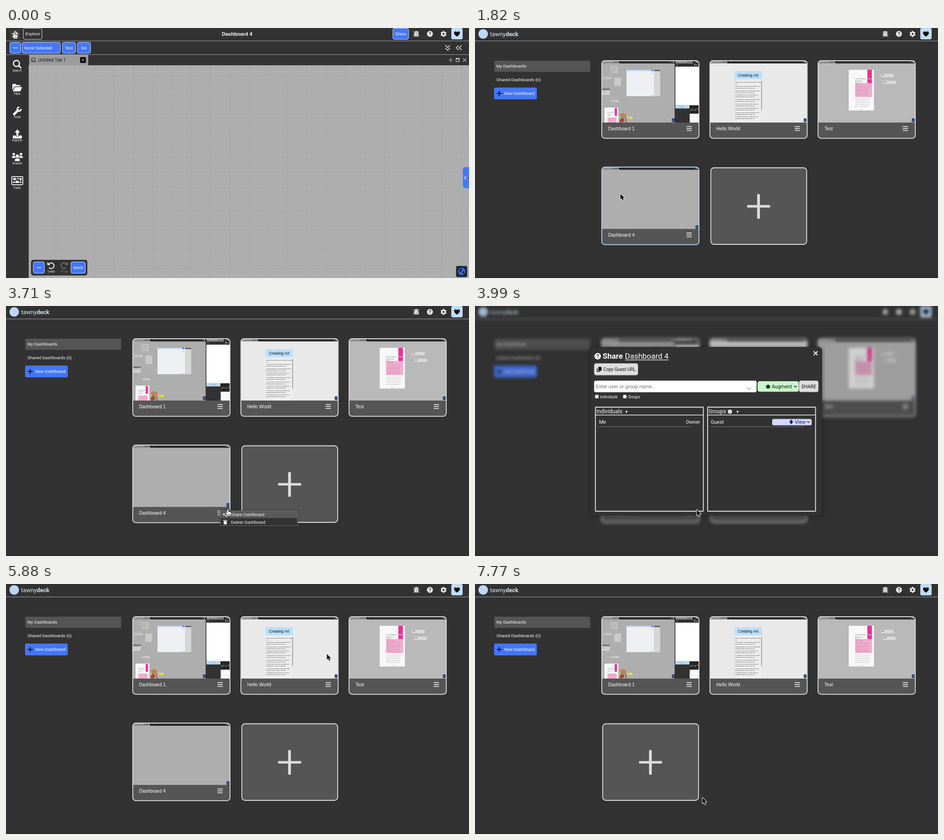
An HTML page with a canvas that plays this animation: 1019 px wide and 550 px high, repeating every 8.4 s.

```html
<!DOCTYPE html>
<html lang="en">
<head>
<meta charset="utf-8">
<title>Dashboards</title>
<style>
html, body { margin: 0; width: 100%; height: 100%; overflow: hidden; background: #323232; }
canvas { display: block; width: 1019px; height: 550px; }
</style>
</head>
<body>
<canvas id="stage" width="1019" height="550"></canvas>
<script>
const W = 1019, H = 550, LOOP = 8400, STEP = 70;
const SANS = '"Liberation Sans", Arial, sans-serif', ROBOTO = 'Roboto, sans-serif';
const DARK = '#323232', BLUE = '#4476f7', PALE = '#bfdcf9', WHITE = '#fff', GREY = '#aeaeae', PINK = '#ec2f96';
const stage = document.getElementById('stage').getContext('2d');
let c = stage;

// ---- drawing helpers ----
function box(x, y, w, h, fill, r = 0, edge, lw = 1) {
  c.beginPath();
  c.roundRect(x, y, w, h, r);
  if (fill) { c.fillStyle = fill; c.fill(); }
  if (edge) { c.strokeStyle = edge; c.lineWidth = lw; c.stroke(); }
}
function disc(x, y, r, fill, ry = r) {
  c.beginPath();
  c.ellipse(x, y, r, ry, 0, 0, 7);
  c.fillStyle = fill;
  c.fill();
}
function ring(x, y, r, color, lw, from = 0, to = 2 * Math.PI) {
  c.beginPath();
  c.arc(x, y, r, from, to);
  c.strokeStyle = color;
  c.lineWidth = lw;
  c.stroke();
}
function shape(d, x, y, fill, edge, lw = 1, cap = 'butt') {
  const p = new Path2D(d);
  c.save();
  c.translate(x, y);
  c.lineCap = cap;
  c.lineJoin = 'round';
  if (edge) { c.strokeStyle = edge; c.lineWidth = lw; c.stroke(p); }
  if (fill) { c.fillStyle = fill; c.fill(p); }
  c.restore();
}
const stroke = (d, x, y, color, lw, cap) => shape(d, x, y, null, color, lw, cap);
function text(s, x, y, size, color = WHITE, font = SANS, style = '', align = 'left') {
  c.font = `${style} ${size}px ${font}`;
  c.textAlign = align;
  c.fillStyle = color;
  c.fillText(s, x, y + size * 0.36);
}
const button = (x, y, w, h) => box(x + .5, y + .5, w - 1, h - 1, BLUE, 3.5, '#dbe4fb');
const cross = (x, y, r, color, lw) => stroke(`M${-r} ${-r}L${r} ${r}M${r} ${-r}L${-r} ${r}`, x, y, color, lw);

// ---- shared header icons ----
function headerIcons() {
  shape('M-3.2 -3.6A3.2 3.2 0 0 1 3.2 -3.6Z', 903, 13.2, '#eee');
  shape('M-3.8 -2.8H3.8V2Q3.8 5.8 0 5.8Q-3.8 5.8 -3.8 2Z', 903, 13.2, '#eee');
  stroke('M-6.3 .6H6.3M-5.6 -5L-3 -2.4H3L5.6 -5M-5.6 5.4L-3 3H3L5.6 5.4', 903, 13.2, '#eee', 1.3, 'round');
  box(902.6, 12, .8, 7, DARK);
  disc(933, 13, 6.5, '#eee');
  text('?', 933, 13, 10, DARK, SANS, 'bold', 'center');
  for (let i = 0; i < 6; i++) {
    c.save();
    c.translate(963, 13);
    c.rotate(i * Math.PI / 3);
    box(-1.7, -6.5, 3.4, 4, '#eee', .6);
    c.restore();
  }
  ring(963, 13, 3.6, '#eee', 2.8);
  box(980, 0, 25, 25, PALE, 3.5);
  shape('M0 6C-4 2.6 -6.3 .6 -6.3 -2C-6.3 -5.8 -1.8 -6.6 0 -3.4C1.8 -6.6 6.3 -5.8 6.3 -2C6.3 .6 4 2.6 0 6Z', 992.5, 13, '#050505');
  box(0, 28, W, 1, '#a5a5a5');
}

// ---- workspace ----
function sidebar() {
  const names = ['Search', 'Files', 'Tools', 'Imports', 'Shared', 'Trails'];
  names.forEach((n, i) => text(n, 24.5, [93.5, 144.5, 195.5, 246.5, 298, 352][i], 6.6, WHITE, SANS, '', 'center'));
  ring(23, 78, 6.7, WHITE, 2.5);
  stroke('M28 83L33.5 88.5', 0, 0, WHITE, 3);
  shape('M14 137V124.5Q14 123 15.5 123H21L23.5 125.5H30Q31.5 125.5 31.5 127V128.5H19.5Z', 0, 0, WHITE);
  shape('M20 130H35.5L31.5 139.5H15Z', 0, 0, WHITE);
  stroke('M17.8 189.6L26.5 181', 0, 0, WHITE, 5, 'round');
  ring(28.8, 178.6, 4.1, WHITE, 3.2, -.1, 4.9);
  box(15, 236.5, 20, 6.5, WHITE, 1.5);
  box(21.5, 234, 7, 4.5, DARK, 1);
  shape('M25 223L31 230H27.2V237.4H22.8V230H19Z', 0, 0, WHITE);
  for (const [x, y, r] of [[17, 277.5, 2.7], [33, 277.5, 2.7], [25, 282, 3.7]]) {
    disc(x, y, r, WHITE);
    box(x - r * 1.45, y + r + 1.2, r * 2.9, r * 1.65, WHITE, [r, r, 1, 1]);
  }
  box(12.8, 326.8, 24, 18, null, 1.5, WHITE, 1.8);
  for (const [x, y, w, h] of [[16, 330, 6, 4], [25, 330, 3, 2], [30, 330, 4, 5], [16, 338, 3, 3], [21, 336, 7, 5], [30, 338, 4, 3]]) box(x, y, w, h, WHITE, .5);
  stroke('M22 332H30M18 334V339M19 340H31M32 335V338', 0, 0, WHITE, .8);
}
function workspace(glow) {
  box(0, 0, W, H, DARK);
  headerIcons();
  box(9, 4, 22, 22, `rgba(255,255,255,${glow})`, 3);
  shape('M20 6L28 13.5H26V21H14V13.5H12Z', 0, 0, '#d4d4d4');
  box(38, .5, 41, 24.5, null, 3.5, '#e8e8e8');
  text('Explore', 42.5, 13, 9.5);
  text('Dashboard 4', 508.5, 13, 11.1, WHITE, SANS, 'bold', 'center');
  button(851, 0, 35.5, 25.5);
  text('Share', 856, 13, 9.5);
  button(8, 31, 25, 25);
  box(15, 43, 11, 1.2, WHITE);
  button(35, 31, 85, 25);
  text('None Selected', 40, 43.5, 9.4);
  button(123.5, 31, 30, 25);
  text('Text', 138.5, 43.5, 9.4, WHITE, SANS, '', 'center');
  button(156.5, 31, 30, 25);
  text('Ink', 171.5, 43.5, 9.4, WHITE, SANS, '', 'center');
  stroke('M-5 -6L0 -1L5 -6M-5 0L0 5L5 0', 972, 44, '#eee', 1.7);
  stroke('M-1 -5L-6 0L-1 5M5.5 -5L.5 0L5.5 5', 997, 43.5, '#eee', 1.7);
  box(0, 58, W, 1, '#a5a5a5');

  sidebar();
  box(50, 59, W - 50, 23, '#333');
  box(51, 59, 130, 23, '#9c9c9c');
  box(56.5, 66.5, 7.5, 5.5, null, .8, '#222', 1.1);
  box(54.5, 73.2, 11.5, 1.2, '#222');
  text('Untitled Tab 1', 70.5, 70.3, 10, '#1c1c1c', ROBOTO);
  box(163, 64, 13, 13, '#0a0a0a', 3);
  cross(169.5, 70.5, 2.7, WHITE, 1);
  stroke('M-5.5 0H5.5M0 -5.5V5.5', 979, 70.5, '#bbb', 1.2);
  box(990.5, 67, 7, 7, null, 0, '#eee', 1.1);
  box(990, 66.5, 8, 2, '#eee');
  cross(1009.5, 70.5, 4, '#bbb', 1.2);

  box(50, 82, W - 50, H - 82, GREY);
  c.setLineDash([2, 2.2]);
  c.strokeStyle = '#989898';
  c.lineWidth = .8;
  c.beginPath();
  for (let x = 67.5; x < W; x += 42.5) { c.moveTo(x, 82); c.lineTo(x, H); }
  for (let y = 104.5; y < H; y += 42.5) { c.moveTo(50, y); c.lineTo(W, y); }
  c.stroke();
  c.setLineDash([]);

  box(55, 510, 124, 34.5, DARK, 5);
  button(59.5, 514, 25.5, 26);
  box(67, 526.5, 11, 1.2, WHITE);
  for (const [x, name, flip, color] of [[99, 'Undo', 1, WHITE], [128, 'Redo', -1, '#777']]) {
    c.save();
    c.translate(x, 523);
    c.scale(flip, 1);
    ring(.5, 0, 6.3, color, 2, -2.7, 2.5);
    shape('M-8 -8V-1.5H-1.5Z', 0, 0, color);
    c.restore();
    text(name, x + .5, 536, 6.6, color, SANS, '', 'center');
  }
  button(142.5, 514, 32.5, 26);
  text('stack', 158.7, 527, 9.5, WHITE, SANS, '', 'center');

  box(1005.5, 306, 20, 46.5, BLUE, 6);
  stroke('M2 -4L-2 0L2 4', 1011, 329.5, WHITE, 1.2);
  box(990.5, 523.5, 24.5, 24.5, '#1d2634', 3.5);
  disc(1003, 535.5, 7.8, BLUE);
  shape('M-6 -2L-3 -6L1 -6L2 -3L-1 -1L-1 2L-3 3L-5 1ZM2 0L6 -1L6 3L3 6L1 4Z', 1003, 535.5, '#1d2634');
}

// ---- thumbnails; origin is the inner corner ----
function strip(w) {
  box(0, 0, w, 6, '#2c2c2c');
  box(0, 0, 42, 6, '#8f8f8f');
  text('Untitled Tab 1', 24, 3, 2.8, '#222', ROBOTO);
  box(38, 1, 4, 4.5, '#0a0a0a', 1);
  box(w - 9, 2, 1.5, 1.5, '#bbb');
  box(w - 5, 1.5, 2, 2.5, '#ddd');
}
function lines(rows, x, y, size, gap, color = '#444', style = '') {
  rows.forEach((s, i) => text(s, x, y + i * gap, size, color, SANS, style));
}
const mark = (x, y) => { box(x, y, 6, 7.5, '#1d2b4d', 1); disc(x + 3, y + 3.7, 1.6, '#5f86e0'); };

function thumbBlank(w) {
  box(0, 0, w, 140, GREY);
  strip(w);
  mark(206, 128);
}
function thumbMixed(w) {
  box(0, 0, w, 140, GREY);
  box(18.5, 12, 16, 15, '#c6c6c6');
  lines(['Notes and ideas', 'for the studio', 'and the project', 'this week'], 19.5, 15, 2, 3);
  box(3, 36, 18, 4.5, '#d0d0d0', 1);
  text('Search the list', 4, 38.2, 2, '#444');
  box(26.5, 36, 16, 20, '#c9c9c9', 0, '#999', .5);
  box(54, 20, 61, 58, '#eef0f4');
  box(54, 20, 61, 2.5, '#c2d3ee');
  box(115, 20, 13, 58, '#d6d6d6');
  box(115, 20, 13, 3, '#666');
  text('View', 108, 27, 2.2, '#444');
  text('Reset all', 105, 76, 2.2, '#444');
  box(109, 20, 4, 3, BLUE);
  box(0, 61, 17, 4, '#777');
  box(0, 65, 17, 10, '#cfcfcf');
  text('Add a title', 1.5, 68, 2, '#444');
  box(20, 87, 17, 4, '#d0d0d0');
  text('Type here', 21, 89, 2, '#444');
  box(5.5, 103, 30.5, 34, '#f6f6f6');
  box(28, 104, 5, 17, PINK);
  lines(['Food, Nutrition,', 'Health and', 'Fitness'], 12, 113, 2.3, 3.5);
  box(12, 125, 20, 12, '#f3aacd');
  box(37, 115, 21, 22, '#b7b3ae');
  shape('M38 118L46 115L54 118L52 125L43 126Z', 0, 0, '#b9854f');
  stroke('M43 125L40 137M51 125L54 136M46 126V131', 0, 0, '#8a562d', 2);
  shape('M38 130L47 126L50 133L41 137Z', 0, 0, '#a04b35');
  box(58, 123.5, 9, 4.5, '#f2e83d');
  text('Note', 59, 125.8, 2, '#333');
  strip(161);
  mark(154, 127);
  box(160, 0, 54, 140, '#262626');
  c.save();
  c.translate(162, 0);
  strip(w - 162);
  c.restore();
  box(161, 6, w, 6.5, '#303030');
  stroke('M164 10L167 8M203 8H206M203 10H206M209 8V11', 0, 0, '#eee', .9);
  box(161.5, 13, 52, 85, WHITE);
  box(161.5, 97, 31, 8, '#b9d8f3');
  box(161.5, 105, 31, 32, '#323232');
  box(192.5, 98, 21, 18.5, '#262626');
  text('Documents', 170, 101, 2.3, '#345');
  stroke('M196 107V110M199 107H201M205 107V110M209 107H211', 0, 0, '#ddd', 1.3);
  box(193, 116.5, 21, 20.5, '#f7f7f7');
}
function thumbText(w) {
  box(0, 0, w, 140, '#e9e9e9');
  strip(w);
  box(54, 23, 60, 17, '#b9dffb');
  text('Creating Art', 83.7, 31.5, 8.4, '#111', SANS, '', 'center');
  box(54, 44, 58.5, 92, '#ededed');
  box(112.5, 45, 1.2, 64, '#777');
  lines(['What are the most important techniques on creating', 'art?'], 55, 47, 2.3, 4, '#000', 'bold');
  const tips = ['Observation: Closely study the subject you', 'Experimentation: Try out different materials',
    'Sketching: Draw loose plans before you', 'Composition: Arrange the parts of a picture',
    'Color Theory: Learn how colors do work', 'Perspective: Use depth to make space in',
    'Practice: Work often to build steady skills', 'Seeking Feedback: Ask others to look at'];
  tips.forEach((s, i) => {
    const y = 56 + i * 9.65;
    text(`${i + 1}. ${s}`, 55, y, 2.5, '#000', SANS, 'bold');
    text('drawing and then look at it with care.', 55, y + 4, 2.5, '#000', SANS, 'bold');
  });
  mark(206, 127);
}
function thumbPoster(w) {
  box(0, 0, w, 140, '#b9b9b9');
  strip(w);
  box(67, 20, 55.5, 89.5, '#f8f8f8');
  box(108, 20, 10, 30, PINK);
  text('Plan', 113, 40, 3, WHITE, SANS, 'bold', 'center');
  lines(['Food, Nutrition,', 'Health and', 'Fitness'], 81, 40, 3.5, 4.6, '#666');
  box(81, 49, 37.5, 31, '#f0aed1');
  lines(['Class Details', 'Meals, energy and rest for', 'people in every age group', 'with simple steps to follow', 'at home or in the kitchen', 'and three tests in the term'], 83, 52.5, 2.5, 4.6, '#7a3a5c');
  lines(['Topics in this class are meals', 'and habits, reading of labels,', 'planning for a week, exercise', 'and sleep, and how to cook.', 'Bring a notebook each day.'], 81, 84.5, 2.5, 4, '#555');
  text('Room 12', 91, 107, 2.3, '#777');
  box(138, 29, 28, 7, '#d9d9d9');
  text('Add', 140, 32.5, 2.6, '#333');
  box(143, 44, 28, 7, '#d9d9d9');
  text('Add', 145, 47.5, 2.6, '#333');
  mark(206, 127);
}

// ---- dashboard list ----
function card(x, y, name, thumb, hot, burgerHot) {
  box(x, y, 216, 172.5, '#555', 8);
  if (thumb) {
    c.save();
    c.beginPath();
    c.roundRect(x, y, 216, 172.5, 8);
    c.clip();
    c.beginPath();
    c.rect(x, y, 216, 137);
    c.clip();
    c.translate(x + 1.5, y + 1);
    thumb(213);
    c.restore();
  }
  box(x + 1, y + 1, 214, 170.7, null, 7, hot ? '#b0d5f5' : '#e0e0e0', 1.8);
  text(name, x + 15, y + 150.2, 10.2);
  if (burgerHot) box(x + 181, y + 139, 24, 23.5, '#686868', 3.5);
  for (let i = 0; i < 3; i++) box(x + 187.5, y + 145 + i * 4.3, 11.5, 1.6, '#f2f2f2');
}
function page({ loaded = true, removed = false, hot = false, burgerHot = false }) {
  box(0, 0, W, H, DARK);
  headerIcons();
  disc(18, 13, 10.5, '#bcd7f8');
  text('tawny', 33, 13, 13, '#dce9f8', ROBOTO);
  const end = 33 + c.measureText('tawny').width;
  text('deck', end, 13, 13, '#cfe2f8', ROBOTO, 'bold');
  box(42.5, 72, 211, 24.5, '#555', 3);
  text('My Dashboards', 47, 84, 9.4);
  text('Shared Dashboards (0)', 47, 114, 9.4);
  box(42, 131, 94, 26, BLUE, 3.5);
  stroke('M-5.5 0H5.5M0 -5.5V5.5', 53.3, 144, '#0c1222', 2);
  text('New Dashboard', 64, 143.7, 9.4);
  card(278, 71, 'Dashboard 1', thumbMixed);
  card(516, 71, 'Hello World', thumbText);
  card(754, 71, 'Test', thumbPoster);
  if (!removed) card(278, 305, 'Dashboard 4', loaded && thumbBlank, hot, burgerHot);
  const x = removed ? 280 : 518;
  box(x + 1, 307.5, 211, 168.5, '#555', 7, '#e0e0e0', 1.8);
  box(x + 81, 389.5, 50.5, 5.6, '#dcdcdc');
  box(x + 103, 365.5, 6, 54, '#dcdcdc');
  box(0, 547.5, W, 2.5, '#2b2729');
}

// ---- context menu ----
function menu(x, y, my) {
  c.save();
  c.shadowColor = 'rgba(0,0,0,.5)';
  c.shadowBlur = 4;
  box(x, y, 171, 34, DARK);
  c.restore();
  box(x + .5, y + .5, 170, 33, null, 0, '#777');
  ['Share Dashboard', 'Delete Dashboard'].forEach((s, i) => {
    const top = y + i * 17;
    if (my >= top - 3 && my < top + 14) box(x + 1, top + 1, 169, 15.5, '#5a5a5a');
    if (i) {
      box(x + 8, top + 6, 7, 7.5, '#eee', 1);
      box(x + 7, top + 3.8, 9, 1.4, '#eee');
    } else {
      stroke('M14 -3.5L8 0L14 3.5', x, top + 8.5, '#eee', 1.1);
      for (const [dx, dy] of [[14, -3.5], [8, 0], [14, 3.5]]) disc(x + dx, top + 8.5 + dy, 1.8, '#eee');
    }
    text(s, x + 24, top + 8.5, 9.4);
  });
}

// ---- share dialog ----
const chevron = (x, y, color, r = 3) => stroke(`M${-r} ${-r / 2}L0 ${r / 2}L${r} ${-r / 2}`, x, y, color, 1.2);
function table(x, name) {
  box(x + 1, 222.5, 237.5, 229, null, 1, '#ececec', 1.8);
  box(x, 239, 239, 1.6, '#ececec');
  text(name, x + 3, 232, 12, WHITE, ROBOTO);
  box(x + 6, 265, 206, 1, '#777');
}
function dialog(closeHot) {
  c.drawImage(blurred, 0, 0);
  c.save();
  c.shadowColor = 'rgba(0,0,0,.45)';
  c.shadowBlur = 10;
  box(255, 90, 509, 371, DARK, 8);
  c.restore();
  disc(270, 110.5, 7.2, '#f4f4f4');
  text('?', 270, 110.5, 11, DARK, SANS, 'bold', 'center');
  text('Share', 281, 110, 17, WHITE, ROBOTO, 'bold');
  text('Dashboard 4', 330, 110, 17, WHITE, ROBOTO);
  box(330, 118, 96, 1.2, WHITE);
  if (closeHot) box(738, 93, 23, 23, '#555', 3.5);
  cross(749.7, 104, 4.3, WHITE, 2);

  box(262.5, 126.5, 96, 25.5, '#dfdfdf', 4, '#b5b5b5');
  box(271.5, 134, 7, 8.5, '#111', 1);
  stroke('M269 137.5V144H275', 0, 0, '#111', 1.6);
  text('Copy Guest URL', 282, 139.3, 10, '#111', ROBOTO);
  box(262.5, 164.5, 357, 25, WHITE, 3, '#ccc');
  text('Enter user or group name...', 265.5, 177, 11, '#757575', ROBOTO);
  stroke('M-4.5 -2L0 2.5L4.5 -2', 603, 181, '#bbb', 1.8);
  box(622.5, 166, 89.5, 22, '#c8f8ca', 3.5, '#e4fbe5');
  shape('M0 -4.8L5 -1.2L3 4.2H-3L-5 -1.2Z', 645, 177.2, '#0c3b12');
  text('Augment', 653, 177, 11, '#101810', ROBOTO);
  chevron(705, 177, '#111');
  box(713.5, 164.5, 42, 24.5, '#dfdfdf', 3.5, '#b5b5b5');
  text('SHARE', 734.5, 176.8, 10.5, '#111', ROBOTO, '', 'center');
  [[264, 'Individuals'], [325.5, 'Groups']].forEach(([x, s]) => {
    box(x + .5, 195.5, 7.5, 7.5, WHITE, 1.5, '#888', .7);
    text(s, x + 11.5, 200, 8.4, WHITE, ROBOTO, 'italic');
  });

  table(264, 'Individuals');
  table(511, 'Groups');
  for (const x of [332, 576.5]) shape('M0 -3L4 0L0 3Z', x, 232.5, WHITE);
  disc(561, 232.5, 4.6, WHITE);
  text('i', 561, 232.5, 7.5, DARK, SANS, 'bold', 'center');
  text('Me', 273, 255, 11, WHITE, ROBOTO);
  text('Owner', 464, 255, 11, WHITE, ROBOTO);
  text('Guest', 519, 255, 11, WHITE, ROBOTO);
  box(654, 248.5, 87, 14, '#d3d8ff', 3.5);
  shape('M0 -5.5L4 0L0 5.5L-4 0Z', 696, 255, '#10206e');
  text('View', 704, 255.2, 11, '#10206e', ROBOTO);
  chevron(734, 255, '#10206e');
}

// ---- pointer ----
const MOVES = [ // time, x, y
  [0, 18, 10], [770, 18, 10], [840, 19, 12], [1330, 19, 12], [1400, 240, 40], [1470, 606, 190], [1540, 500, 330],
  [1610, 317, 363], [1750, 317, 363], [2590, 469, 450], [3430, 469, 451], [3710, 488, 448], [4550, 488, 448],
  [5320, 748, 98], [5740, 748, 98], [6300, 481, 457], [6580, 476, 456], [7070, 476, 456], [7490, 500.5, 470], [LOOP, 500.5, 470]
];
const HANDS = [[0, 840], [2800, 3990], [5250, 5740], [6510, 7770]];
const CLICKS = [[490, 630], [2940, 3080], [3850, 3990], [5460, 5600], [6790, 6930]];
const active = (list, t) => list.find(([a, b]) => t >= a && t < b);

function pointerAt(t) {
  const i = Math.max(1, MOVES.findIndex(m => m[0] > t));
  const [t0, x0, y0] = MOVES[i - 1], [t1, x1, y1] = MOVES[i];
  let k = (t - t0) / (t1 - t0);
  if (t1 - t0 > STEP) k = k * k * (3 - 2 * k);
  return [x0 + (x1 - x0) * k, y0 + (y1 - y0) * k];
}
function pointer(x, y, hand) {
  if (hand) {
    shape('M-1.5 1A1.4 1.4 0 0 1 1.3 1V5C2 4 3.6 4 3.8 5.4C4.4 4.6 6 4.8 6 6.2C6.8 5.6 8 6 8 7.2C8 10 7 11 6.4 13.6H-.5C-1 12 -4 9 -4.4 8C-4.4 6.6 -2.6 6.8 -1.5 8.2Z', x, y, WHITE, '#111', 2);
    stroke('M1.4 9V12M3.4 9V12M5.3 9V12', x, y, '#222', .8);
  } else {
    shape('M0 0V12.6L2.9 10L5 14.8L7.2 13.8L5.2 9.2H9.2Z', x, y, '#0a0a0a', '#f4f4f4', 2);
  }
}
function clickRing(x, y, age) {
  c.save();
  c.globalAlpha = Math.min(1, .5 + age / STEP / 2);
  ring(x, y, 25.7, '#0a0a0a', 1.6);
  ring(x, y, 24.5, '#ededed', 1.2);
  c.restore();
}

// ---- timeline ----
function draw(t) {
  const [x, y] = pointerAt(t);
  const menuOpen = active([[3010, 3920], [6860, 7700]], t);
  const inside = (l, top, r, b) => x >= l && x < r && y >= top && y < b;
  if (t < 840) {
    workspace(.06 + .08 * Math.min(1, t / 210));
  } else if (t >= 3920 && t < 5670) {
    dialog(inside(737, 92, 761, 116));
  } else {
    page({
      loaded: t >= 980,
      removed: t >= 7770,
      hot: !menuOpen && inside(278, 305, 494, 478),
      burgerHot: !menuOpen && inside(459, 444, 483, 468)
    });
    if (menuOpen) t < 5000 ? menu(471, 450, y) : menu(478, 454, y);
  }
  pointer(x, y, active(HANDS, t));
  const click = active(CLICKS, t);
  if (click) clickRing(x - .5, Math.max(27, y - 1), t - click[0]);
}

function offscreen(paint) {
  const cv = document.createElement('canvas');
  cv.width = W;
  cv.height = H;
  c = cv.getContext('2d');
  paint();
  c = stage;
  return cv;
}
const sharp = offscreen(() => page({}));
const blurred = offscreen(() => {
  box(0, 0, W, H, DARK);
  c.filter = 'blur(3px)';
  c.drawImage(sharp, 0, 0);
  c.filter = 'none';
  box(0, 0, W, H, 'rgba(45,45,45,.2)');
});

let last = -1;
const start = performance.now();
function tick(now) {
  const t = Math.floor((Math.max(0, now - start) % LOOP) / STEP) * STEP;
  if (t !== last) draw(last = t);
  requestAnimationFrame(tick);
}
draw(0);
requestAnimationFrame(tick);
</script>
</body>
</html>
```
